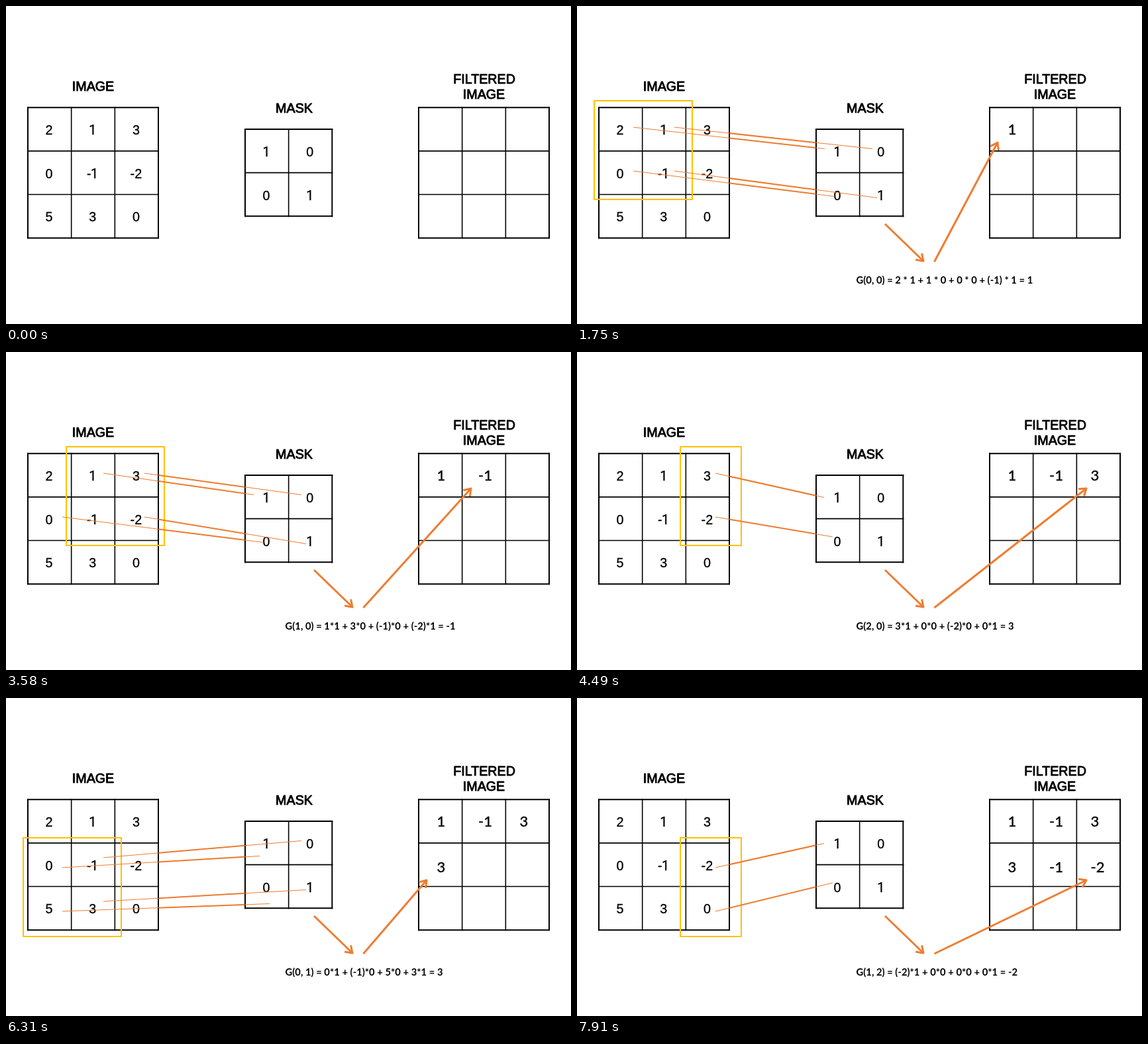
Animation, 853 px wide and 480 px high, one loop 8 s. Source, as an HTML page with a canvas:

```html
<!DOCTYPE html>
<html lang="en">
<head>
<meta charset="utf-8">
<title>Image filtering with a mask</title>
<style>
html, body { margin: 0; width: 100%; height: 100%; overflow: hidden; background: #fff; }
canvas { display: block; }
</style>
</head>
<body>
<canvas width="853" height="480"></canvas>
<script>
const ctx = document.querySelector('canvas').getContext('2d');
const LOOP = 8000, INTRO = 1070, HOLD = 1140;
const CELL = 65.67, ORANGE = '#ed7d31', YELLOW = '#ffc000';
const image = [[2, 1, 3], [0, -1, -2], [5, 3, 0]];
const mask = [[1, 0], [0, 1]];
const labels = ['0, 0', '1, 0', '2, 0', '0, 1', '1, 1', '1, 2'];
const maskCells = mask.flatMap((row, my) => row.map((factor, mx) => ({ mx, my, factor })));

const steps = labels.map((label, i) => {
  const col = i % 3, row = Math.floor(i / 3);
  const terms = maskCells.map(({ mx, my, factor }) => [image[row + my][col + mx] ?? 0, factor]);
  const result = terms.reduce((sum, [a, b]) => sum + a * b, 0);
  const times = i ? '*' : ' * ';
  const products = terms.map(([a, b]) => (a < 0 ? `(${a})` : a) + times + b);
  return { col, row, result, formula: `G(${label}) = ${products.join(' + ')} = ${result}` };
});

function text(str, x, y, font, { align = 'center', weight = 0 } = {}) {
  ctx.font = font;
  ctx.textAlign = align;
  ctx.fillStyle = ctx.strokeStyle = '#000';
  ctx.fillText(str, x, y);
  if (weight) {
    ctx.lineWidth = weight;
    ctx.strokeText(str, x, y);
  }
}

function heading(str, x, y) {
  text(str, x, y, '19.7px "Liberation Sans", sans-serif', { weight: .9 });
}

function line(points, color, width) {
  ctx.strokeStyle = color;
  ctx.lineWidth = width;
  ctx.beginPath();
  points.forEach(p => ctx.lineTo(...p));
  ctx.stroke();
}

function grid(x, y, size, values = []) {
  const end = size * CELL;
  for (let i = 0; i <= size; i++) {
    const d = i * CELL, width = i % size ? 1.6 : 2;
    line([[x + d, y - 1], [x + d, y + end + 1]], '#000', width);
    line([[x - 1, y + d], [x + end + 1, y + d]], '#000', width);
  }
  values.forEach((row, r) => row.forEach((value, c) => {
    // Roboto has a plain 1 without a foot
    const family = Math.abs(value) === 1 ? 'Roboto' : '"Liberation Sans"';
    text(value, x + (c + .5) * CELL - .8, y + (r + .5) * CELL + 8, `19.7px ${family}, sans-serif`, { weight: .3 });
  }));
}

function arrow(from, tip) {
  const back = Math.atan2(from[1] - tip[1], from[0] - tip[0]);
  const wing = turn => [tip[0] + 12 * Math.cos(back + turn), tip[1] + 12 * Math.sin(back + turn)];
  line([from, tip], ORANGE, 3);
  line([wing(.6), tip, wing(-.6)], ORANGE, 3);
}

// Thin over the tables, thicker in the gap between them
function link(from, to) {
  line([from, to], ORANGE, 1.2);
  ctx.save();
  ctx.beginPath();
  ctx.rect(231, 0, 129, 480);
  ctx.clip();
  line([from, to], ORANGE, 2);
  ctx.restore();
}

function links({ col, row }) {
  const alone = col === 2;
  for (const { mx, my } of maskCells) {
    if (col + mx > 2) continue;
    // The lower-left link of the top row keeps its start for the first two columns
    const startCol = !row && my && !mx && !alone ? 0 : col + mx;
    const from = [85 + 62 * startCol, 183 + 66 * my + row * (mx ? 58 : 73)];
    const to = mx ? [446 + 7 * my, 215.5 + 74 * my]
      : alone ? [373 + 13 * my, 219.5 + 59.5 * my]
      : [374 + 9 * row + 15 * my, 215.5 + 23 * row + 72 * my];
    link(from, to);
  }
}

function stepAt(time) {
  const slot = Math.floor((time - INTRO) / HOLD);
  return slot > 1 ? slot - 1 : slot; // the second step is held twice as long
}

function draw(time) {
  ctx.fillStyle = '#fff';
  ctx.fillRect(0, 0, 853, 480);
  heading('IMAGE', 131.5, 128);
  heading('MASK', 435, 161);
  heading('FILTERED', 722, 117);
  heading('IMAGE', 721.5, 140);
  grid(33, 153.2, 3, image);
  grid(361, 186, 2, mask);
  grid(623, 153.2, 3);

  const current = stepAt(time);
  if (current < 0) return;
  steps.slice(0, current + 1).forEach(({ col, row, result }) =>
    text(result, 650.5 + 62.5 * col, 194 + 69 * row, '22px Lato, sans-serif', { align: 'left', weight: .4 }));

  const step = steps[current], { col, row } = step;
  ctx.strokeStyle = YELLOW;
  ctx.lineWidth = 2;
  ctx.strokeRect(26 + 65 * col, 143 + 68 * row, col < 2 ? 148 : 92, 149);
  links(step);
  arrow([465, 329], [523, 385]);
  arrow([539.5, 386], [635 + 67 * col, 206 + 69 * row]);
  text(step.formula, 421.5, 419, 'bold 14.8px Lato, sans-serif', { align: 'left' });
}

function tick(now) {
  draw(now % LOOP);
  requestAnimationFrame(tick);
}
ctx.lineJoin = 'round';
draw(0);
requestAnimationFrame(tick);
</script>
</body>
</html>
```
